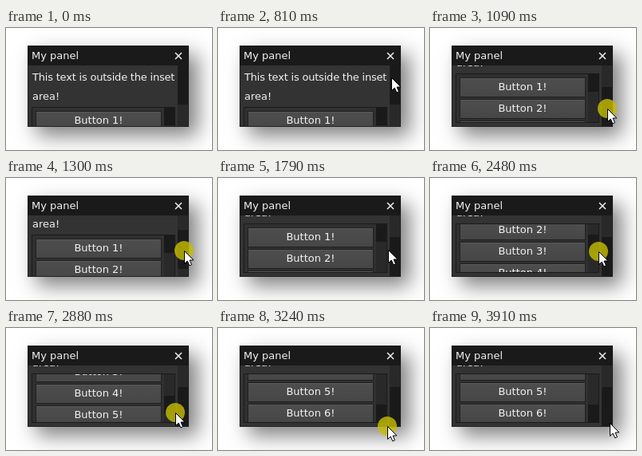
An HTML page with a canvas that plays this animation: 258 px wide and 153 px high, repeating every 3.98 s.

```html
<!DOCTYPE html>
<html lang="en">
<head>
<meta charset="utf-8">
<title>Panel with nested scroll areas</title>
<style>
html, body { margin: 0; width: 100%; height: 100%; overflow: hidden; background: #fff; }
canvas { display: block; width: 258px; height: 153px; }
</style>
</head>
<body>
<canvas id="stage" width="258" height="153"></canvas>
<script>
const ctx = document.getElementById('stage').getContext('2d');
const LOOP = 3980;
const FONT = '13px "DejaVu Sans", sans-serif';
const INK = '#f2f2f2';
const DARK = '#1a1a1a';

// Bursts of pointer updates: start, end, count
const BURSTS = [
  [260, 610, 6], [810, 1300, 8], [1370, 1850, 8], [1920, 2410, 8],
  [2480, 2950, 8], [3020, 3240, 4], [3570, 3710, 3], [3910, 3910, 1]
];

// Pointer path: time, x, y
const PATH = [
  [260, 241, 104], [400, 226, 80], [540, 214, 63], [610, 213, 61],
  [810, 217, 62], [880, 221, 73], [1020, 222, 94], [1160, 222, 108],
  [1300, 223, 91], [1440, 224, 80], [1650, 224, 108], [1790, 212, 89],
  [1850, 211, 82], [1920, 210, 79], [2200, 210, 84], [2480, 211, 92],
  [2950, 212, 111], [3240, 212, 123], [3570, 213, 123], [3710, 220, 120],
  [3910, 224.5, 119]
];

const OUTER = { from: 880, to: 1700, grab: 73, travel: 27, range: 42 };
const INNER = { from: 1920, to: 3560, grab: 78.7, travel: 37.8, range: 102 };

const clamp = (v, lo, hi) => Math.max(lo, Math.min(hi, v));
const held = (drag, t) => t >= drag.from && t <= drag.to;

function snapTime(t) {
  let last = 0;
  for (const [a, b, n] of BURSTS) {
    for (let i = 0; i < n; i++) {
      const step = n > 1 ? Math.round(a + (b - a) * i / (n - 1)) : a;
      if (step <= t) last = step;
    }
  }
  return last;
}

function pointerAt(t) {
  const i = PATH.findIndex(p => p[0] >= t);
  if (i <= 0) return { x: PATH[0][1], y: PATH[0][2] };
  const [a, b] = [PATH[i - 1], PATH[i]];
  const k = (t - a[0]) / (b[0] - a[0]);
  return { x: a[1] + (b[1] - a[1]) * k, y: a[2] + (b[2] - a[2]) * k };
}

// Fraction scrolled, kept after the drag is released
function progress(drag, t) {
  if (t < drag.from) return 0;
  if (t > drag.to) return 1;
  return clamp((pointerAt(t).y - drag.grab) / drag.travel, 0, 1);
}

function box(x, y, w, h, color) {
  ctx.fillStyle = color;
  ctx.fillRect(x, y, w, h);
}

function frame(x, y, w, h, color) {
  ctx.strokeStyle = color;
  ctx.lineWidth = 1;
  ctx.strokeRect(x + 0.5, y + 0.5, w - 1, h - 1);
}

function clipped(x, y, w, h, draw) {
  ctx.save();
  ctx.beginPath();
  ctx.rect(x, y, w, h);
  ctx.clip();
  draw();
  ctx.restore();
}

function label(text, x, y, align = 'left', tracking = 0) {
  ctx.font = FONT;
  ctx.textAlign = align;
  ctx.letterSpacing = tracking + 'px';
  ctx.fillStyle = INK;
  ctx.fillText(text, x, y);
}

function button(text, y) {
  const fill = ctx.createLinearGradient(0, y, 0, y + 25);
  fill.addColorStop(0, '#4e4e4e');
  fill.addColorStop(1, '#464646');
  box(37, y, 158, 25, fill);
  box(38, y + 1, 156, 1, '#595959');
  frame(37, y, 158, 25, '#202020');
  label(text, 116, y + 16, 'center');
}

function scrollbar(x, y, w, h, thumbY, thumbH) {
  box(x, y, w, h, '#292929');
  box(x, thumbY, w, thumbH, DARK);
}

function inset(top, part) {
  box(32, top, 180, 62, '#303030');
  frame(32, top, 180, 62, DARK);
  clipped(33, top + 1, 178, 60, () => {
    const scroll = Math.round(part * INNER.range);
    for (let i = 0; i < 6; i++) button(`Button ${i + 1}!`, top + 5 + i * 27 - scroll);
    scrollbar(198, top + 1, 13, 60, top + 1 + Math.round(part * INNER.travel), 22);
  });
}

function panel(outer, inner) {
  ctx.save();
  ctx.shadowColor = 'rgba(0,0,0,.5)';
  ctx.shadowBlur = 24;
  ctx.shadowOffsetX = ctx.shadowOffsetY = 11;
  box(27, 22, 202, 102, '#333');
  ctx.restore();

  clipped(28, 47, 200, 76, () => {
    const scroll = Math.round(outer * OUTER.range);
    label('This text is outside the inset', 33, 66 - scroll, 'left', -0.2);
    label('area!', 33, 90 - scroll);
    inset(99 - scroll, inner);
    scrollbar(215, 47, 13, 76, 47 + Math.round(outer * OUTER.travel), 49);
  });
  frame(27, 22, 202, 102, '#222');

  box(27, 22, 202, 25, DARK);
  label('My panel', 32, 39);
  ctx.strokeStyle = INK;
  ctx.lineWidth = 1.5;
  ctx.beginPath();
  ctx.moveTo(212, 31);
  ctx.lineTo(220, 39);
  ctx.moveTo(220, 31);
  ctx.lineTo(212, 39);
  ctx.stroke();
}

function pointer(x, y, pressed) {
  if (pressed) {
    ctx.fillStyle = 'rgba(200,190,0,.8)';
    ctx.beginPath();
    ctx.arc(x, y, 12, 0, Math.PI * 2);
    ctx.fill();
  }
  ctx.save();
  ctx.translate(x + 0.5, y + 0.5);
  ctx.beginPath();
  for (const [px, py] of [[0, 0], [0, 16], [3.7, 12.6], [6.3, 18.4], [9, 17.2], [6.5, 11.6], [11.4, 11.4]]) {
    ctx.lineTo(px, py);
  }
  ctx.closePath();
  ctx.fillStyle = '#fff';
  ctx.fill();
  ctx.strokeStyle = '#000';
  ctx.lineWidth = 1;
  ctx.stroke();
  ctx.restore();
}

function render(now) {
  const t = snapTime(now % LOOP);
  box(0, 0, 258, 153, '#fff');
  panel(progress(OUTER, t), progress(INNER, t));
  if (t > 0) {
    const p = pointerAt(t);
    pointer(Math.round(p.x), Math.round(p.y), held(OUTER, t) || held(INNER, t));
  }
}

const start = performance.now();
function tick() {
  render(performance.now() - start);
  requestAnimationFrame(tick);
}
tick();
</script>
</body>
</html>
```
